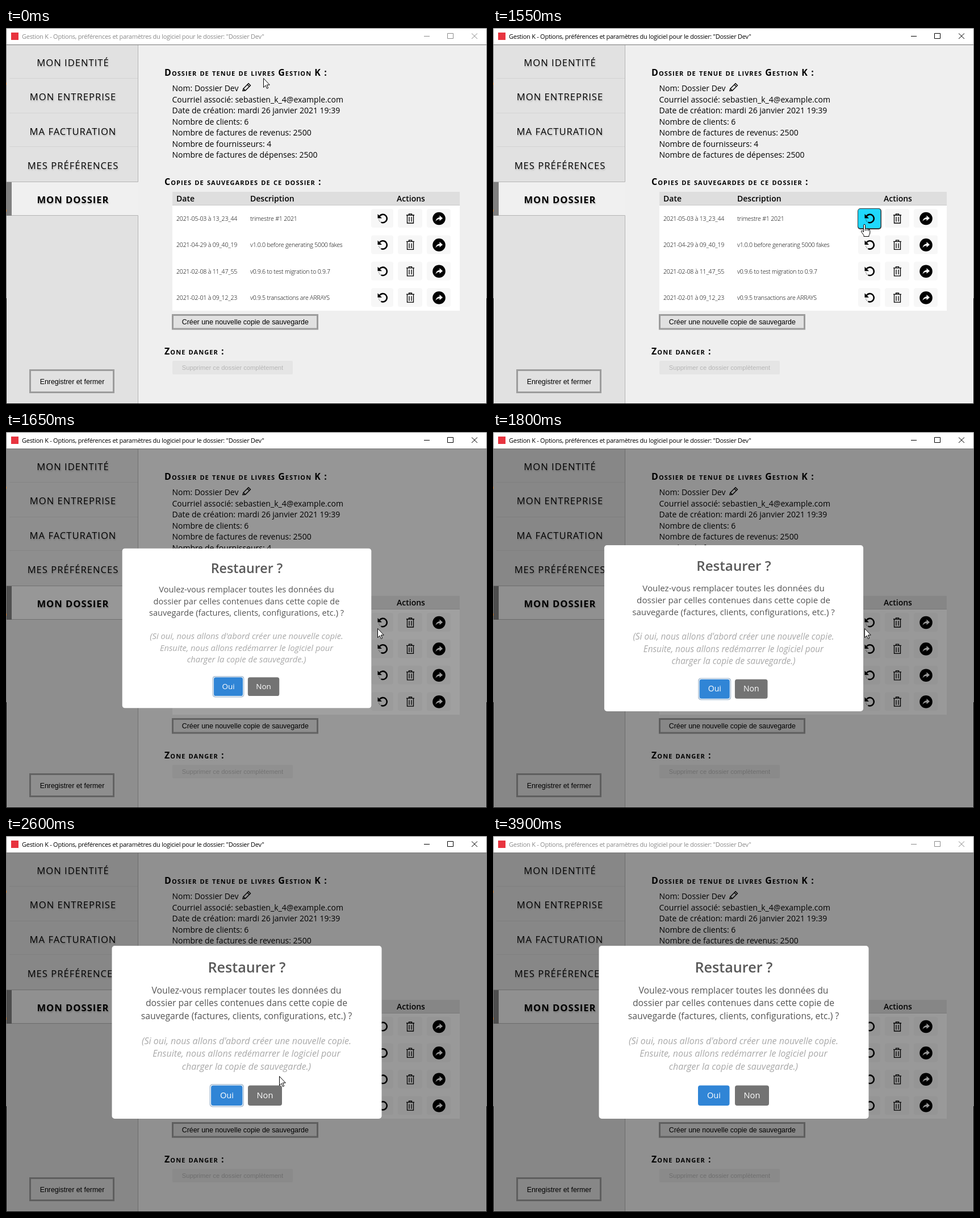
An HTML page that plays this animation: 847 px wide and 661 px high, repeating every 3950 ms.

```html
<!DOCTYPE html>
<html lang="fr">
<head>
<meta charset="utf-8">
<title>Préférences du dossier</title>
<style>
html, body { margin: 0; width: 100%; height: 100%; overflow: hidden; background: #fff; }
svg { display: block; font-family: "Open Sans", "Noto Sans", sans-serif; font-size: 14px; }
text { white-space: pre; }
.mid { text-anchor: middle; }
.nav { font-size: 16.6px; letter-spacing: 1px; filter: drop-shadow(1px 2px 1px #0003); }
.head { font-size: 16px; font-weight: 700; font-variant: small-caps; letter-spacing: 1.06px; }
.th { font-weight: 600; }
.row { font-size: 10.6px; font-weight: 300; letter-spacing: -.2px; }
.btn { font-family: "Liberation Sans", Arial, sans-serif; font-size: 12.4px; }
.frame { fill: #e1e1e1; stroke: #9c9c9c; stroke-width: 3px; }
.body { font-size: 15.8px; fill: #545454; }
.note { font-size: 16px; font-style: italic; fill: #a9a9a9; }
.line { fill: none; stroke: #000; }
</style>
</head>
<body>
<svg width="847" height="661" viewBox="0 0 847 661">
  <defs>
    <g id="restore">
      <path class="line" stroke-width="2.6" d="M-5.5-4.5A7.2 7.2 0 1 1-2.8 6.6"/>
      <path class="line" stroke-width="1.6" stroke-dasharray="1.5 1.2" opacity=".4" d="M-2.8 6.6A7.2 7.2 0 0 1-7 1.5"/>
      <path d="M-9-8V-.5H-1.5Z"/>
    </g>
    <path id="trash" class="line" stroke-width="1.3" d="M-7-6H7M-2.5-6V-8.2H2.5V-6M-5.5-6V8H5.5V-6M-2-3V5.5M2-3V5.5"/>
    <g id="share">
      <circle r="11.3"/>
      <path fill="#fff" d="M-6 5C-5 0-2-2 1-2V-5.5L6.5-.5 1 4V1C-2 1-4 2-6 5Z"/>
    </g>
  </defs>

  <rect width="847" height="661" fill="#efefef"/>
  <rect width="847" height="29" fill="#fff"/>
  <rect x="9" y="8" width="13" height="13" fill="#e8343f"/>
  <g id="bar">
    <text x="28" y="18.5" font-size="11" letter-spacing="-.27">Gestion K - Options, préférences et paramètres du logiciel pour le dossier: "Dossier Dev"</text>
    <path fill="none" stroke="currentColor" d="M736 14.5H746M777.5 9.5H787.5V18.5H777.5ZM820 9.5L830 19M830 9.5L820 19"/>
  </g>

  <rect x="1" y="29" width="232" height="631" fill="#e1e1e1"/>
  <path class="line" style="stroke:#d3d3d3" d="M6 88.5H232M6 149.5H232M6 208.5H232"/>
  <rect x="1" y="270" width="232" height="60" fill="#f0f0f0"/>
  <rect x="1" y="270" width="9" height="60" fill="#808080"/>
  <path class="line" style="stroke:#b4b4b4" d="M232.5 29V270.5H1M10 329.5H232.5V660"/>
  <g id="nav" class="nav mid"></g>
  <rect class="frame" x="42.5" y="601.5" width="147" height="39"/>
  <text class="btn mid" x="116.5" y="626">Enregistrer et fermer</text>

  <text class="head" x="279" y="84">Dossier de tenue de livres Gestion K :</text>
  <g id="facts"></g>
  <path class="line" stroke-width="1.4" d="M417 110.5L418 106.5 427 97.5 430.5 101 421.5 110ZM425 99.5L428.5 103M418 106.5L421.5 110"/>

  <text class="head" x="279" y="276">Copies de sauvegardes de ce dossier :</text>
  <rect x="293" y="288" width="506" height="209" fill="#fff"/>
  <rect x="293" y="288" width="506" height="23" fill="#dedede"/>
  <rect x="293" y="311" width="506" height="1" fill="#cbcbcb"/>
  <text class="th" x="300" y="305">Date</text>
  <text class="th" x="430" y="305">Description</text>
  <text class="th mid" x="713" y="305">Actions</text>
  <g id="rows"></g>
  <rect class="frame" x="293.5" y="504.5" width="255" height="24.5"/>
  <text class="btn mid" x="421.3" y="521">Créer une nouvelle copie de sauvegarde</text>

  <text class="head" x="279" y="574">Zone danger :</text>
  <rect x="293" y="585" width="212" height="24" rx="2" fill="#e5e5e5"/>
  <text class="btn mid" x="399" y="601" style="font-size:11.15px" fill="#b6b6b6">Supprimer ce dossier complètement</text>

  <rect id="shade" x="1" y="29" width="845" height="631"/>
  <path class="line" style="stroke:#777" d="M0 .5H847M.5 0V475M846.5 0V475M1 29.5H846"/>
  <path class="line" d="M.5 475V660.5H846.5V475"/>
  <path class="line" style="stroke:#c87a32" d="M.5 96V100M.5 319V323"/>

  <g id="modal">
    <rect x="186.5" y="193" width="475" height="304" rx="5" fill="#fff"/>
    <text class="mid" x="424" y="240" font-size="25.2" font-weight="600" fill="#595959">Restaurer ?</text>
    <g id="message" class="mid"></g>
    <rect id="ring" x="358.5" y="436" width="60.5" height="40.5" rx="5" fill="#adc1d5"/>
    <rect x="360" y="437.5" width="57.5" height="37.5" rx="4.5" fill="#fff"/>
    <rect id="yes" x="361" y="438.5" width="55.5" height="35.5" rx="4"/>
    <rect x="426" y="438.5" width="60" height="35.5" rx="4" fill="#737373"/>
    <g class="mid" fill="#fff" font-size="14.6">
      <text x="389" y="461">Oui</text>
      <text x="456" y="461">Non</text>
    </g>
  </g>

  <g id="cursor" fill="#fff" stroke="#000">
    <path id="arrow" d="M.5.5V16.5L4 13 6.5 18.5 8.7 17.5 6.3 12H11.3Z"/>
    <path id="hand" d="M-1.5 1.7Q-1.5.3 0 .3T1.5 1.7V8Q3 6.3 4.3 8.3 6.3 7 7.2 9.2 9.8 8.5 9.8 11.3V15Q9.8 17.5 8 19.5V21.5H-1V19.5L-5.2 13.5Q-6 11-3.7 11.2L-1.5 13.5ZM1.5 8V11.5M4.3 8.3V11.5M7.2 9.2V12"/>
  </g>
</svg>
<script>
const $ = id => document.getElementById(id);
const stack = (id, items, draw) => $(id).innerHTML = items.map(draw).join('');

stack('nav', ['MON IDENTITÉ', 'MON ENTREPRISE', 'MA FACTURATION', 'MES PRÉFÉRENCES', 'MON DOSSIER'],
  (s, i) => `<text x="118" y="${66.8 + 60.4 * i}" ${i == 4 ? 'font-weight="700"' : ''}>${s}</text>`);

stack('facts', ['Nom: Dossier Dev', 'Courriel associé: sebastien_k_4@example.com',
  'Date de création: mardi 26 janvier 2021 19:39', 'Nombre de clients: 6',
  'Nombre de factures de revenus: 2500', 'Nombre de fournisseurs: 4',
  'Nombre de factures de dépenses: 2500'],
  (s, i) => `<text x="292.5" y="${111 + 19.5 * i}">${s}</text>`);

const tile = (x, w) => `<rect x="${x}" y="-17" width="${w}" height="33" rx="4" fill="#f7f7f7"/>`;
stack('rows', [['2021-05-03 à 13_23_44', 'trimestre #1 2021'],
  ['2021-04-29 à 09_40_19', 'v1.0.0 before generating 5000 fakes'],
  ['2021-02-08 à 11_47_55', 'v0.9.6 to test migration to 0.9.7'],
  ['2021-02-01 à 09_12_23', 'v0.9.5 transactions are ARRAYS']],
  ([date, label], i) => `<g transform="translate(0 ${335 + 46.4 * i})">
    <text class="row" x="300" y="4">${date}</text><text class="row" x="430" y="4">${label}</text>
    ${tile(643, 39)}${tile(690, 43)}${tile(741, 42)}
    ${i ? '' : `<g id="hover"><rect x="642" y="-18" width="42" height="37" rx="5" fill="#333"/>
      <rect x="643" y="-17" width="39.5" height="34" rx="4" fill="#1fd8fd"/></g>`}
    <use href="#restore" x="663.5"/><use href="#trash" x="712"/><use href="#share" x="762.5"/></g>`);

stack('message', ['Voulez-vous remplacer toutes les données du',
  'dossier par celles contenues dans cette copie de',
  'sauvegarde (factures, clients, configurations, etc.) ?', '',
  "(Si oui, nous allons d'abord créer une nouvelle copie.",
  'Ensuite, nous allons redémarrer le logiciel pour', 'charger la copie de sauvegarde.)'],
  (s, i) => `<text class="${i < 3 ? 'body' : 'note'}" x="423.5" y="${277 + 22.25 * i}">${s}</text>`);

const clamp = v => Math.max(0, Math.min(1, v));

// CSS "ease": cubic-bezier(.25, .1, .25, 1)
function ease(x) {
  const curve = (u, a, b) => 3 * u * (1 - u) ** 2 * a + 3 * u * u * (1 - u) * b + u ** 3;
  let lo = 0, hi = 1;
  for (let i = 0; i < 20; i++) {
    const u = (lo + hi) / 2;
    if (curve(u, .25, .25) < x) lo = u; else hi = u;
  }
  return curve(lo, .1, 1);
}
const smooth = p => p * p * (3 - 2 * p);

// Interpolates rows of [time, ...values]
function track(keys, t, f) {
  if (t <= keys[0][0]) return keys[0].slice(1);
  const i = keys.findIndex(k => k[0] > t);
  if (i < 0) return keys[keys.length - 1].slice(1);
  const a = keys[i - 1], b = keys[i], p = f((t - a[0]) / (b[0] - a[0]));
  return a.slice(1).map((v, j) => v + (b[j + 1] - v) * p);
}

const path = [[0, 453, 88], [550, 650, 325], [850, 661, 346], [950, 661, 346], [1050, 671, 346],
  [1200, 654, 345], [1900, 654, 345], [2050, 649, 346], [2150, 649, 346], [2200, 648, 346],
  [2300, 648, 346], [2600, 481, 422], [2750, 368, 455], [2850, 383, 459], [2950, 377, 462],
  [3150, 377, 462], [3500, 171, 628]];
const pop = [[1600, .7], [1735, 1.05], [1840, .95], [1900, 1]];
const show = (id, on) => $(id).style.display = on ? '' : 'none';

function draw(now) {
  const t = Math.floor(now % 3950 / 50) * 50;
  const active = t >= 1550 && t < 3900, open = t >= 1600;

  $('bar').style.color = $('bar').style.fill = active ? '#000' : '#8b8b8b';
  $('hover').style.opacity = open ? 0 : ease(clamp((t - 550) / 300));
  $('shade').style.opacity = open ? .4 * ease(clamp((t - 1583) / 100)) : 0;

  const [s] = track(pop, t, ease);
  show('modal', open);
  show('ring', t < 3900);
  $('modal').setAttribute('transform', `translate(424 345) scale(${s}) translate(-424 -345)`);

  const [x, y] = track(path, t, t < 550 ? smooth : p => p);
  const onYes = open && t < 3550 && x > 361 && x < 417 && y > 438 && y < 474;
  const hand = onYes || t >= 600 && !open;
  $('yes').style.fill = onYes ? '#2b78c1' : '#3085d6';
  show('cursor', t < 3550);
  show('arrow', !hand);
  show('hand', hand);
  $('cursor').setAttribute('transform', `translate(${Math.round(x)} ${Math.round(y)})`);
  requestAnimationFrame(draw);
}
draw(performance.now());
</script>
</body>
</html>
```
